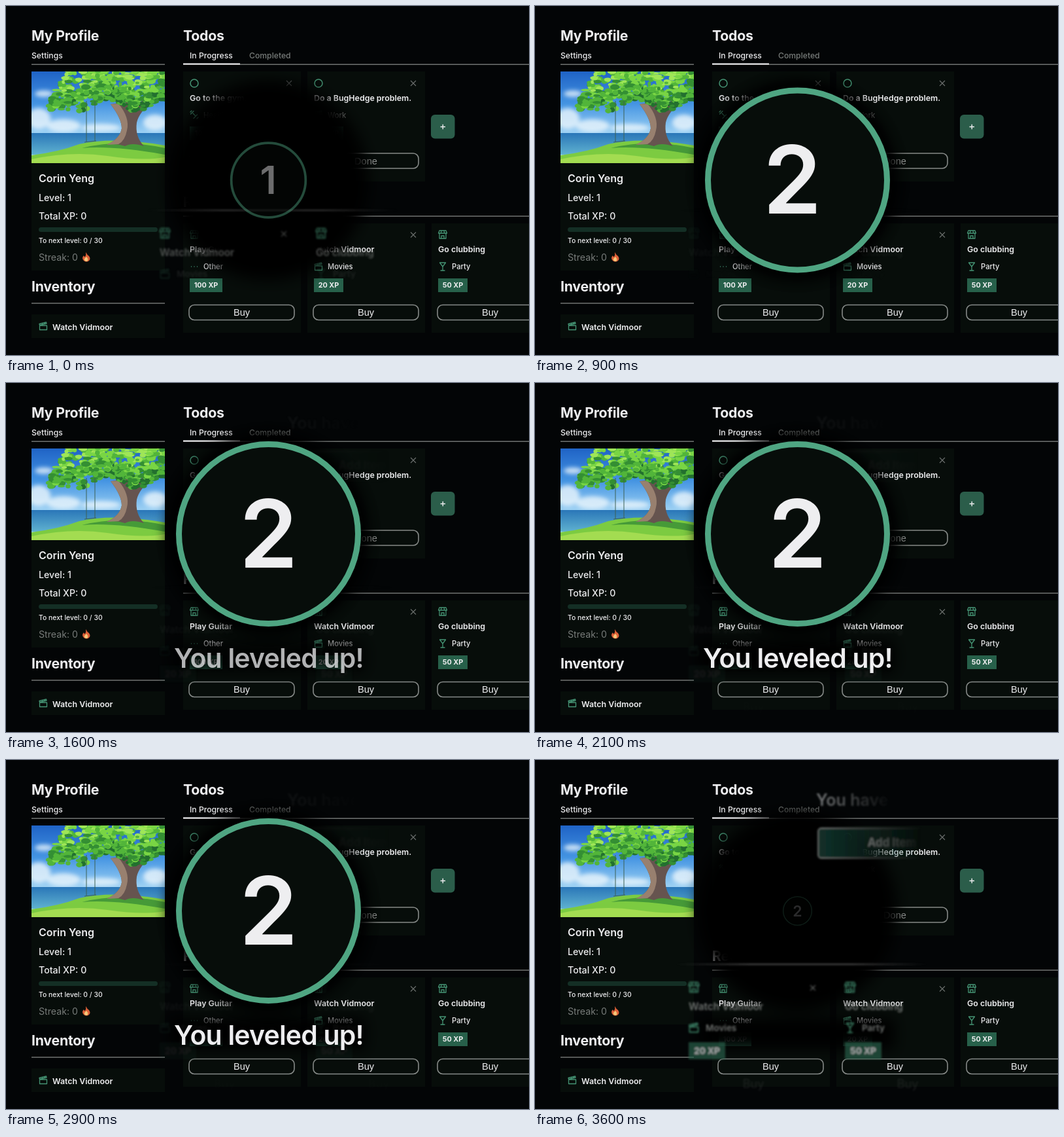
Recreate the animation shown at these times as an HTML page. Size 800x533 px, loop 3700 ms.

```html
<!DOCTYPE html>
<html lang="en">
<head>
<meta charset="utf-8">
<title>Level up</title>
<style>
  html, body { margin: 0; width: 100%; height: 100%; overflow: hidden; background: #030506; }
  svg { display: block; width: 800px; height: 533px; }
  text { font-family: Inter, "Liberation Sans", sans-serif; font-optical-sizing: none; white-space: pre; }
  .head { letter-spacing: -.012em; }
  .message { letter-spacing: -.02em; }
  .btn { font-family: "Liberation Sans", Arial, sans-serif; }
  .icon { fill: none; stroke: #459474; stroke-width: 1.3; stroke-linecap: round; stroke-linejoin: round; }
</style>
</head>
<body>
<svg id="stage" viewBox="0 0 800 533"></svg>
<script>
const WHITE = '#eeeef0', GRAY = '#777b79', CARD = '#070d0a', TAG = '#27604a', DARK = '#020404';
const ICONS = {
  shop: 'M-5-6h10l1.5 4h-13zM-5-2v8h10v-8M-2 6v-4h4v4M-2-6l-.7 4M2-6l.7 4',
  movie: 'M-5.5-1h11v6.5h-11zM-5.5-1.5l-.5-2 10.5-2.5 .5 2zM-2-4.5l1.5 2M1.5-5.5l1.5 2',
  glass: 'M-4.5-6h9l-4.5 6zM0 0v6M-3 6h6',
  dots: 'M-4.5 0h.1M0 0h.1M4.5 0h.1',
  gym: 'M-2-2l4 4M-5.5-1l4.5-4.5M-1 5.5l5.5-5.5M-6-4l2-2M4 6l2-2'
};

const text = (x, y, size, weight, fill, str, extra = '') =>
  `<text x="${x}" y="${y}" font-size="${size}" font-weight="${weight}" fill="${fill}" ${extra}>${str}</text>`;
const mid = 'text-anchor="middle"';
const heading = (x, y, str) => text(x, y, 21.3, 700, WHITE, str, 'class="head"');
const rect = (x, y, w, h, fill, extra = '') =>
  `<rect x="${x}" y="${y}" width="${w}" height="${h}" fill="${fill}" ${extra}/>`;
const rule = (x, y, w) => rect(x, y, w, 1.2, '#8b8e8c');
const icon = (name, x, y, scale = 1) =>
  `<path class="icon" d="${ICONS[name]}" transform="translate(${x} ${y}) scale(${scale})"/>`;
const cross = (x, y) =>
  `<path d="M${x - 4} ${y - 4}l8 8m0-8l-8 8" stroke="#6b6f6d" stroke-width="1.1"/>`;
const button = (x, y, label, fill) =>
  rect(x, y, 161, 23, 'none', 'rx="8" stroke="#858987" stroke-width="1.6"') +
  text(x + 80.5, y + 16.7, 14.6, 400, fill, label, `class="btn" ${mid}`);
const tag = (x, y, w, h, label, size) =>
  rect(x, y, w, h, TAG) + text(x + w / 2, y + h / 2 + size * .36, size, 700, WHITE, label, mid);

const todo = (x, title, name, category, xp) =>
  rect(x, 100, 180, 168, CARD) +
  `<circle cx="${x + 17}" cy="118" r="6" fill="none" stroke="#459474" stroke-width="1.5"/>` +
  cross(x + 162, 118) + text(x + 10, 145, 12.4, 600, WHITE, title) +
  icon(name, x + 17, 166) + text(x + 31, 170.5, 11.2, 500, '#8d908e', category) +
  tag(x + 10, 184, 45, 21, xp, 10.8) + button(x + 9, 225, 'Done', '#a2a5a3');

const reward = (x, title, name, category, xp, w) =>
  rect(x, 332, 180, 167, CARD) + icon('shop', x + 17, 349) + cross(x + 162, 349.5) +
  text(x + 10, 376, 12.4, 600, WHITE, title) +
  icon(name, x + 17, 398) + text(x + 31, 402, 11.2, 500, WHITE, category) +
  tag(x + 10, 416, w, 21, xp, 10.8) + button(x + 9, 456.5, 'Buy', WHITE);

function picture() {
  let seed = 7, leaves = '';
  const rnd = () => (seed = seed * 16807 % 2147483647) / 2147483647;
  const greens = ['#23702f', '#348f33', '#52b53a', '#79d544', '#9fe657'];
  for (let i = 0; i < 520; i++) {
    const x = 68 + rnd() * 176;
    const top = x < 95 ? 98 + (95 - x) * 1.7 : 98;
    const bottom = x < 95 ? 158 : 152 + 9 * Math.sin(x / 14);
    const y = top + rnd() * (bottom - top);
    const light = Math.floor(rnd() * 3 + 2.4 * (bottom - y) / 55);
    leaves += `<ellipse cx="${x.toFixed(1)}" cy="${y.toFixed(1)}" rx="${(2.5 + rnd() * 5).toFixed(1)}" ry="${(1.8 + rnd() * 2.5).toFixed(1)}" fill="${greens[Math.min(4, light)]}"/>`;
  }
  return `<g clip-path="url(#photo)">${rect(39, 100, 204, 140, 'url(#sky)')}
    <g fill="#eaf5fc" opacity=".8" filter="url(#soft)">
      <ellipse cx="50" cy="172" rx="18" ry="16"/><ellipse cx="88" cy="183" rx="26" ry="10"/>
      <ellipse cx="58" cy="134" rx="14" ry="5"/><ellipse cx="228" cy="178" rx="18" ry="12"/>
      <ellipse cx="145" cy="186" rx="30" ry="6"/></g>
    ${rect(39, 194, 204, 33, 'url(#sea)')}
    <path d="M39 228Q80 223 112 211Q165 199 243 213V240H39Z" fill="#7ccb41"/>
    <path d="M116 217Q175 202 243 217V227Q165 213 116 217Z" fill="#469a38"/>
    <path d="M39 234Q100 221 155 229T243 231V240H39Z" fill="#a3dc51"/>
    <path d="M154 212Q174 203 177 187Q177 172 160 150L192 146Q198 154 217 139L225 144Q203 163 200 178Q197 199 211 214Q193 208 182 214Q168 209 154 212Z" fill="#66544f"/>
    <path d="M154 212Q174 203 177 187Q177 172 160 150L172 149Q190 171 185 190Q182 206 172 211Z" fill="#98806f"/>
    ${leaves}
    <path d="M123 145V207M136 145V206M120 208L138 206" stroke="#3d6055"/></g>`;
}

const ghostCard = (x, title) =>
  icon('shop', x + 8, 347, 1.25) + text(x, 382, 15.3, 600, '#777a78', title);
const ghostLow = (x, name, category) =>
  icon(name, x + 8, 409, 1.2) + text(x + 26, 414, 13.5, 600, '#777a78', category);

const stage = document.getElementById('stage');
stage.innerHTML = `<defs>
  <linearGradient id="sky" x2="0" y2="1"><stop stop-color="#1f63c6"/><stop offset=".35" stop-color="#4494e2"/><stop offset=".7" stop-color="#a4d6f5"/></linearGradient>
  <linearGradient id="sea" x2="0" y2="1"><stop stop-color="#2a76b8"/><stop offset="1" stop-color="#5fb2d0"/></linearGradient>
  <linearGradient id="fade" gradientUnits="userSpaceOnUse" x1="440" x2="592"><stop stop-color="#fff"/><stop offset="1" stop-color="#000"/></linearGradient>
  <linearGradient id="fadeText" gradientUnits="userSpaceOnUse" x1="440" x2="545"><stop stop-color="#77797a"/><stop offset="1" stop-color="#77797a" stop-opacity="0"/></linearGradient>
  <linearGradient id="rule"><stop stop-color="#555" stop-opacity="0"/><stop offset=".3" stop-color="#555"/><stop offset=".7" stop-color="#555"/><stop offset="1" stop-color="#555" stop-opacity="0"/></linearGradient>
  <mask id="right" maskUnits="userSpaceOnUse" x="0" y="0" width="800" height="533">${rect(0, 0, 800, 533, 'url(#fade)')}</mask>
  <clipPath id="photo"><rect x="39" y="100" width="204" height="140"/></clipPath>
  <filter id="soft"><feGaussianBlur stdDeviation="3"/></filter>
  <filter id="haze" filterUnits="userSpaceOnUse" x="0" y="0" width="800" height="533"><feGaussianBlur stdDeviation="1.4"/></filter>
  <filter id="wide" filterUnits="userSpaceOnUse" x="-400" y="-400" width="1600" height="1400"><feGaussianBlur stdDeviation="11"/></filter>
</defs>
${rect(0, 0, 800, 533, '#030506')}
${heading(39, 53, 'My Profile')}${text(39, 79.5, 12.2, 500, WHITE, 'Settings')}${rule(39, 88.6, 204)}
${rect(39, 240, 204, 164, CARD)}${picture()}
${text(50, 269, 16, 600, WHITE, 'Corin Yeng')}
${text(50, 297.5, 14.2, 500, WHITE, 'Level: 1')}${text(50, 325.5, 14.2, 500, WHITE, 'Total XP: 0')}
${rect(50, 338, 182, 7, '#142f25', 'rx="3.5"')}
${text(50, 362, 10.4, 500, WHITE, 'To next level: 0 / 30')}${text(50, 388.5, 14.2, 400, GRAY, 'Streak: 0')}
<path d="M122 376Q124 380 127 382Q130 386 127 389Q123 392 119 389Q115 385 119 381Q119 383 121 383Q123 380 122 376Z" fill="#dd6038"/>
<path d="M123 383Q127 387 124 390Q119 390 120 386Z" fill="#f5c879"/>
${heading(39, 436, 'Inventory')}${rule(39, 453.4, 204)}
${rect(39, 471, 204, 36, CARD)}${icon('movie', 57, 489)}${text(71, 495, 12.4, 600, WHITE, 'Watch Vidmoor')}
${heading(271, 53, 'Todos')}
${text(281, 79.5, 12.2, 500, WHITE, 'In Progress')}${text(372, 79.5, 12.2, 500, GRAY, 'Completed')}
${rule(271, 88.6, 529)}${rect(271, 87.5, 87, 2, WHITE)}
${todo(271, 'Go to the gym.', 'gym', 'Health', '10 XP')}
${todo(461, 'Do a BugHedge problem.', 'movie', 'Work', '20 XP')}
${rect(650, 166, 36.5, 36.5, '#2b5d4a', 'rx="6"')}
<path d="M664.5 184.5h7.5m-3.75-3.75v7.5" stroke="${WHITE}" stroke-width="1.4"/>
${heading(271, 307, 'Rewards')}${rule(271, 320.4, 529)}
${reward(271, 'Play Guitar', 'dots', 'Other', '100 XP', 50)}
${reward(461, 'Watch Vidmoor', 'movie', 'Movies', '20 XP', 45)}
${reward(651, 'Go clubbing', 'glass', 'Party', '50 XP', 45)}
<g filter="url(#wide)" fill="${DARK}">
  <circle id="shade" cx="401" r="153"/>
  <rect id="textShade" x="250" y="394" width="300" height="48"/>
</g>
<g id="ghosts" filter="url(#haze)">
  <g id="ghostTop">
    ${text(430, 70, 25, 600, 'url(#fadeText)', 'You have')}
    <g mask="url(#right)">
      ${rect(433, 104, 190, 46, '#12332a', 'rx="5" stroke="#727775" stroke-width="1.8"')}
      ${text(509, 132, 17, 600, '#c9ccca', 'Add Item')}
    </g>
  </g>
  ${rect(215, 311, 385, 2, 'url(#rule)')}
  ${ghostCard(235, 'Watch Vidmoor')}${ghostCard(474, 'Go clubbing')}${cross(425, 348)}
  <g id="ghostMid">${ghostLow(235, 'movie', 'Movies')}${ghostLow(474, 'glass', 'Party')}</g>
  <g id="ghostTags">
    <g opacity=".75">${tag(235, 431, 56, 26, '20 XP', 13.5)}${tag(474, 431, 56, 26, '50 XP', 13.5)}</g>
    <g opacity=".1">${text(334, 501, 18, 400, WHITE, 'Buy', mid)}${text(570, 501, 18, 400, WHITE, 'Buy', mid)}</g>
  </g>
</g>
<g id="badge">
  <circle r="148" opacity=".5" filter="url(#wide)"/>
  <circle r="137" fill="${CARD}" stroke="#4fa582" stroke-width="9"/>
  ${text(0, 51, 144, 600, WHITE, '1', `id="digit" ${mid}`)}
</g>
<g id="message">
  <g opacity=".5" filter="url(#haze)">${text(402, 438, 41, 600, '#000', 'You leveled up!', `class="message" ${mid}`)}</g>
  ${text(402, 435, 41, 600, WHITE, 'You leveled up!', `class="message" ${mid}`)}
</g>`;

const el = id => document.getElementById(id);
const set = (id, name, value) => el(id).setAttribute(name, value);
const progress = (t, start, length) => Math.min(1, Math.max(0, (t - start) / length));
const easeOut = p => 1 - (1 - p) ** 3;

function draw() {
  const t = Math.floor(performance.now() % 3700 / 100) * 100;
  const lift = easeOut(progress(t, 1000, 600));
  const shown = progress(t, 1300, 400);
  const leave = progress(t, 3200, 476);
  const scale = t < 3200 ? .415 + .585 * easeOut(progress(t, 0, 400)) : 1 - leave;
  const y = 266 - 35.5 * lift;

  set('badge', 'transform', `translate(401.5 ${y}) scale(${scale})`);
  set('badge', 'opacity', Math.min(1, scale * 1.1));
  el('digit').textContent = t < 700 ? '1' : '2';
  set('digit', 'x', t < 700 ? -1 : -8 * (1 - lift));
  set('message', 'opacity', shown * Math.max(0, 1 - leave * 1.3));

  set('shade', 'cy', y);
  set('textShade', 'opacity', shown);
  set('ghosts', 'opacity', Math.max(.1, 1.1 - 1.05 * scale));
  set('ghostTop', 'opacity', lift);
  set('ghostMid', 'opacity', .3 + .7 * shown);
  set('ghostTags', 'opacity', shown);
  requestAnimationFrame(draw);
}
draw();
</script>
</body>
</html>
```
